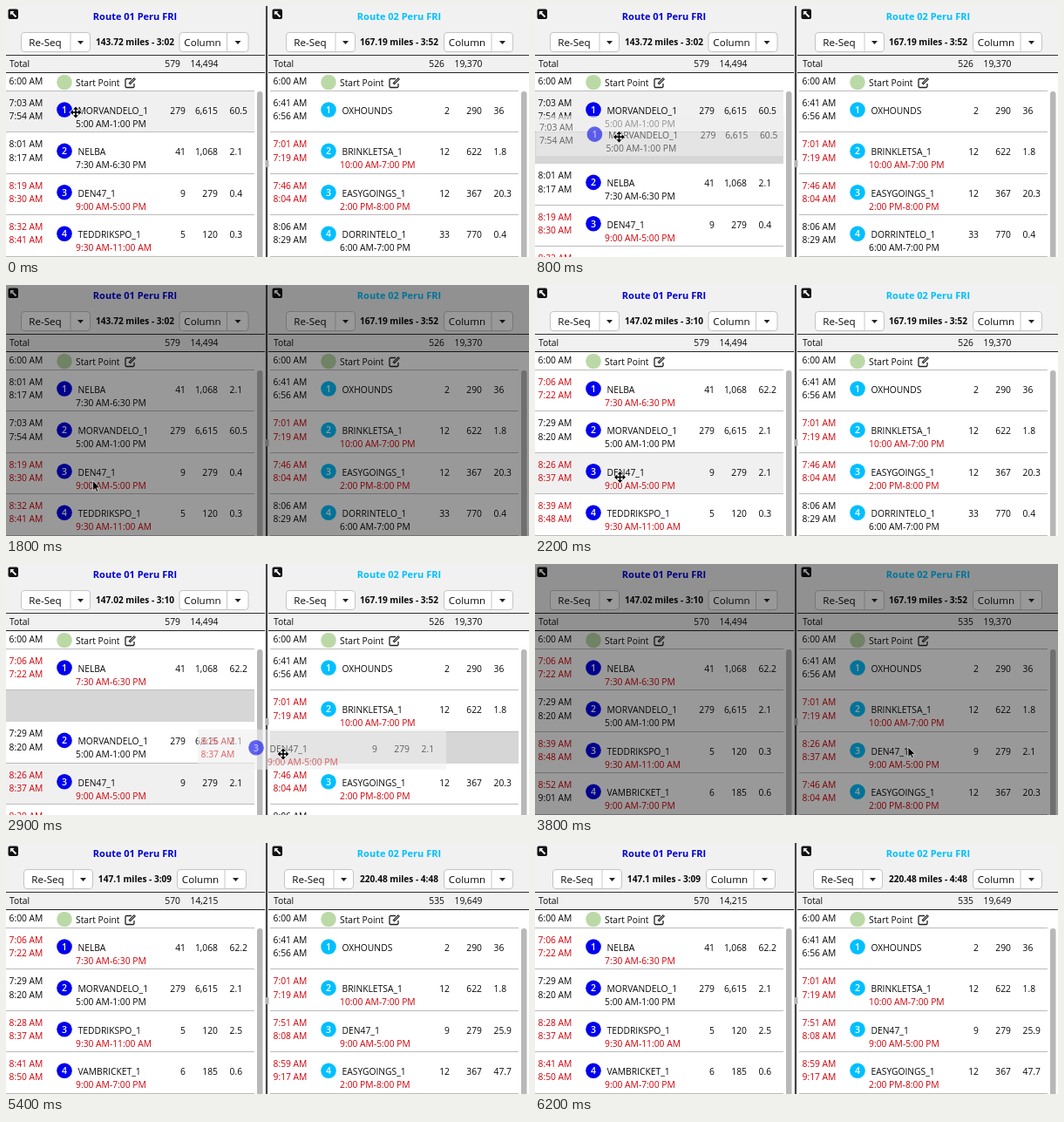
An HTML page with a canvas that plays this animation: 600 px wide and 288 px high, repeating every 6.3 s.

```html
<!DOCTYPE html>
<html lang="en">
<head>
<meta charset="utf-8">
<title>Route planner</title>
<style>
html, body { margin: 0; width: 100%; height: 100%; overflow: hidden; background: #fff; }
canvas { display: block; }
</style>
</head>
<body>
<canvas id="stage" width="600" height="288"></canvas>
<script>
const ctx = document.getElementById('stage').getContext('2d');
const LOOP = 6300, STEP = 100;
const TOP = 98, PITCH = 47.4, GAP = 36, COL2 = 303;
const INK = '#080808', RED = '#cc0008', FAMILY = '"Open Sans", "Noto Sans", sans-serif';

// A leading "!" marks a late time, shown in red.
const row = (from, to, name, stops, load, miles, hours = '') =>
  ({ from, to, name, stops, load, miles, hours });
const late = (r, from, to, miles = r.miles, hours = r.hours) => ({ ...r, from, to, miles, hours });

const mart = row('7:03 AM', '7:54 AM', 'MORVANDELO_1', '279', '6,615', '60.5', '5:00 AM-1:00 PM');
const nelba = row('8:01 AM', '8:17 AM', 'NELBA', '41', '1,068', '2.1', '7:30 AM-6:30 PM');
const den = row('!8:19 AM', '!8:30 AM', 'DEN47_1', '9', '279', '0.4', '!9:00 AM-5:00 PM');
const tedd = row('!8:32 AM', '!8:41 AM', 'TEDDRIKSPO_1', '5', '120', '0.3', '!9:30 AM-11:00 AM');
const vamb = row('!8:52 AM', '9:01 AM', 'VAMBRICKET_1', '6', '185', '0.6', '!9:00 AM-7:00 PM');
const hounds = row('6:41 AM', '6:56 AM', 'OXHOUNDS', '2', '290', '36');
const brink = row('!7:01 AM', '!7:19 AM', 'BRINKLETSA_1', '12', '622', '1.8', '!10:00 AM-7:00 PM');
const easy = row('!7:46 AM', '!8:04 AM', 'EASYGOINGS_1', '12', '367', '20.3', '!2:00 PM-8:00 PM');
const dorr = row('8:06 AM', '8:29 AM', 'DORRINTELO_1', '33', '770', '0.4', '6:00 AM-7:00 PM');

const nelba2 = late(nelba, '!7:06 AM', '!7:22 AM', '62.2', '!7:30 AM-6:30 PM');
const mart2 = late(mart, '7:29 AM', '8:20 AM', '2.1');
const den2 = late(den, '!8:26 AM', '!8:37 AM', '2.1');
const tedd2 = late(tedd, '!8:39 AM', '!8:48 AM');

const route = (trip, stops, load, rows, left = 17, right = 198.5) =>
  ({ trip, stops, load, rows, left, right });
const second = route('167.19 miles - 3:52', '526', '19,370', [hounds, brink, easy, dorr], 18, 199);
const reordered = route('147.02 miles - 3:10', '579', '14,494', [nelba2, mart2, den2, tedd2, vamb]);

const scenes = [
  [0, route('143.72 miles - 3:02', '579', '14,494', [mart, nelba, den, tedd]), second],
  [1500, route('143.72 miles - 3:02', '579', '14,494', [nelba, mart, den, tedd]), second],
  [2100, reordered, second],
  [3500, { ...reordered, stops: '570', rows: [nelba2, mart2, tedd2, vamb] },
    { ...second, stops: '535', rows: [hounds, brink, den2, easy, dorr] }],
  [4400, route('147.1 miles - 3:09', '570', '14,215', [nelba2, mart2,
      late(tedd, '!8:28 AM', '!8:37 AM', '2.5'), late(vamb, '!8:41 AM', '!8:50 AM')], 20, 196),
    route('220.48 miles - 4:48', '535', '19,649', [hounds, brink,
      late(den, '!7:51 AM', '!8:08 AM', '25.9'), late(easy, '!8:59 AM', '!9:17 AM', '47.7')], 16, 199)]
];

const drags = [
  { start: 500, end: 1500, index: 0, x: 95, y: 122 },
  { start: 2300, end: 3500, index: 2, x: 98, y: 221 }
];
const busy = [[1500, 2100], [3600, 4400]];
const path = [
  [0, 80, 122], [400, 95, 122], [500, 95, 122], [1400, 100.5, 230.5], [1600, 101, 230],
  [2100, 97, 220], [2300, 98, 221], [2600, 205, 170], [2900, 318, 218],
  [3400, 428, 212], [4100, 428, 212], [4500, 352.5, 203], [5000, 335, 310], [6300, 335, 310]
];

function cursorAt(t) {
  const i = path.findIndex((p, n) => n && t <= p[0]);
  const [t0, x0, y0] = path[i - 1], [t1, x1, y1] = path[i];
  const u = (t - t0) / (t1 - t0), e = u * u * (3 - 2 * u);
  return { x: x0 + (x1 - x0) * e, y: y0 + (y1 - y0) * e };
}

function text(str, x, y, { size = 10.3, weight = 400, color = INK, align = 'left' } = {}) {
  const red = str[0] === '!';
  ctx.font = `${weight} ${size}px ${FAMILY}`;
  ctx.textAlign = align;
  ctx.fillStyle = red ? RED : color;
  ctx.fillText(red ? str.slice(1) : str, x, y);
}

function rect(x, y, w, h, color) {
  ctx.fillStyle = color;
  ctx.fillRect(x, y, w, h);
}

function rounded(x, y, w, h, r, fill, stroke) {
  ctx.beginPath();
  ctx.roundRect(x, y, w, h, r);
  if (fill) { ctx.fillStyle = fill; ctx.fill(); }
  if (stroke) { ctx.strokeStyle = stroke; ctx.lineWidth = 1; ctx.stroke(); }
}

function disc(x, y, r, color) {
  ctx.beginPath();
  ctx.arc(x, y, r, 0, Math.PI * 2);
  ctx.fillStyle = color;
  ctx.fill();
}

function poly(points, fill) {
  ctx.beginPath();
  points.forEach(([x, y]) => ctx.lineTo(x, y));
  ctx.closePath();
  ctx.fillStyle = fill;
  ctx.fill();
}

function line(points, color, width) {
  ctx.beginPath();
  points.forEach(([x, y]) => ctx.lineTo(x, y));
  ctx.strokeStyle = color;
  ctx.lineWidth = width;
  ctx.stroke();
}

function button(x, label, width, split) {
  rounded(x + .5, 30.5, width, 22, 3.5, '#fff', '#c4c4c4');
  line([[x + split, 31], [x + split, 52]], '#c8c8c8', 1);
  text(label, x + split / 2 - .5, 45.5, { size: 11.6, align: 'center' });
  const mid = x + (split + width) / 2 + .5;
  poly([[mid - 3.5, 40], [mid + 3.5, 40], [mid, 44]], '#222');
}

function expandIcon() {
  rounded(2.5, 3.5, 11.5, 11.5, 2, '#111');
  poly([[5, 6], [9.5, 6], [5, 10.5]], '#fff');
  line([[7, 8], [11.5, 12.5]], '#fff', 1.8);
}

function editIcon() {
  line([[144, 83.5], [138, 83.5], [137, 84.5], [137, 92.5], [138, 93.5],
    [146, 93.5], [147, 92.5], [147, 89]], '#222', 1.3);
  line([[141.5, 89.5], [148, 83]], '#222', 2.8);
  line([[142.5, 88.5], [147.5, 83.5]], '#fff', .8);
}

function drawRow(r, number, y, accent) {
  text(r.from, 3.5, y + 17);
  text(r.to, 3.5, y + 32.2);
  disc(67, y + 21, 8.8, accent);
  text(String(number), 67, y + 24.8, { weight: 600, size: 10.5, color: '#fff', align: 'center' });
  text(r.name, 82.5, y + 26);
  text(r.hours, 80, y + 41);
  text(r.stops, 206, y + 26, { align: 'right' });
  text(r.load, 243, y + 26, { align: 'right' });
  text(r.miles, 256.5, y + 26);
}

function drawPanel(x, title, heading, accent, data, gap, lit) {
  ctx.save();
  ctx.translate(x, 0);
  rect(-3, 0, 300, 76, '#f1f1f1');
  expandIcon();
  text(title, 148, 16, { size: 11, weight: 700, color: heading, align: 'center' });
  button(data.left, 'Re-Seq', 79, 57);
  button(data.right, 'Column', 79, 55);
  text(data.trip, 148, 45, { weight: 700, size: 10.1, align: 'center' });
  rect(-3, 56, 300, 1, '#333');
  rect(-3, 76, 300, 1, '#222');
  text('Total', 4, 70);
  text(data.stops, 200, 70, { align: 'right' });
  text(data.load, 243.5, 70, { align: 'right' });

  text('6:00 AM', 3.5, 90);
  disc(67, 87.5, 8.8, '#bbd9a6');
  text('Start Point', 80, 92);
  editIcon();
  rect(0, TOP - 1, 285, 1, '#bbb');
  data.rows.forEach((r, i) => {
    const y = TOP + PITCH * i + (i >= gap ? GAP : 0);
    if (i === gap) rect(0, Math.round(y - GAP), 285, GAP, '#d6d6d6');
    if (i === lit) rect(0, Math.round(y), 285, 47, '#f0f0f0');
    rect(0, Math.round(y + PITCH) - 1, 285, 1, '#bbb');
    drawRow(r, i + 1, y, accent);
  });
  rounded(288, TOP, 6.5, 200, 3, '#b8b8b8');
  ctx.restore();
}

function drawMoveCursor({ x, y }) {
  ctx.save();
  ctx.translate(x, y);
  const arms = (color, grow) => {
    for (let i = 0; i < 4; i++) {
      ctx.rotate(Math.PI / 2);
      poly([[0, -6.5 - grow], [3 + grow, -3.2 + grow / 2], [-3 - grow, -3.2 + grow / 2]], color);
      rect(-.8 - grow / 2, -4, 1.6 + grow, 4, color);
    }
  };
  arms('#fff', 1.2);
  arms('#000', 0);
  ctx.restore();
}

function drawArrow({ x, y }) {
  ctx.save();
  ctx.translate(x, y - 2);
  const shape = [[0, 0], [0, 11.5], [2.7, 9], [4.5, 13], [6.3, 12.2], [4.6, 8.3], [8.2, 8.2]];
  poly(shape, '#000');
  line([...shape, shape[0]], '#ddd', .8);
  ctx.restore();
}

function draw(t) {
  const [, one, two] = scenes.findLast(s => t >= s[0]);
  const cursor = cursorAt(t);
  const drag = drags.find(d => t >= d.start && t < d.end);
  const waiting = busy.some(([a, b]) => t >= a && t < b);
  const hovered = Math.floor((cursor.y - TOP) / PITCH);
  const inSecond = cursor.x > 302;
  let lit1 = -1, lit2 = -1, gap1 = Infinity, gap2 = Infinity;

  if (drag) {
    lit1 = drag.index;
    if (drag === drags[0]) gap1 = cursor.y < 190 ? 1 : 2;
    else {
      gap1 = t < 2500 ? 2 : 1;
      if (inSecond) gap2 = 2;
    }
  } else if (!waiting) {
    if (inSecond) lit2 = hovered;
    else lit1 = hovered;
  }

  rect(0, 0, 600, 288, '#fff');
  drawPanel(0, 'Route 01 Peru FRI', '#0000d4', '#0000ec', one, gap1, lit1);
  drawPanel(COL2, 'Route 02 Peru FRI', '#00bfff', '#00bfff', two, gap2, lit2);
  rect(297, 0, 4, 288, '#e8e8e8');
  rect(298, 0, 2, 288, '#444');
  rounded(297.5, 177, 4, 8, 1, '#b5b5b5');

  if (drag) {
    ctx.save();
    ctx.globalAlpha = .6;
    ctx.translate(cursor.x - drag.x, cursor.y - drag.y);
    const y = TOP + PITCH * drag.index;
    rect(0, y, 285, 46, '#efefef');
    drawRow(one.rows[drag.index], drag.index + 1, y, '#0000ec');
    ctx.restore();
  }
  if (waiting) {
    rect(0, 0, 600, 288, 'rgba(0,0,0,.4)');
    drawArrow(cursor);
  } else {
    drawMoveCursor(cursor);
  }
}

function tick() {
  const t = performance.now() % LOOP;
  draw(Math.floor(t / STEP) * STEP);
  requestAnimationFrame(tick);
}
tick();
</script>
</body>
</html>
```
